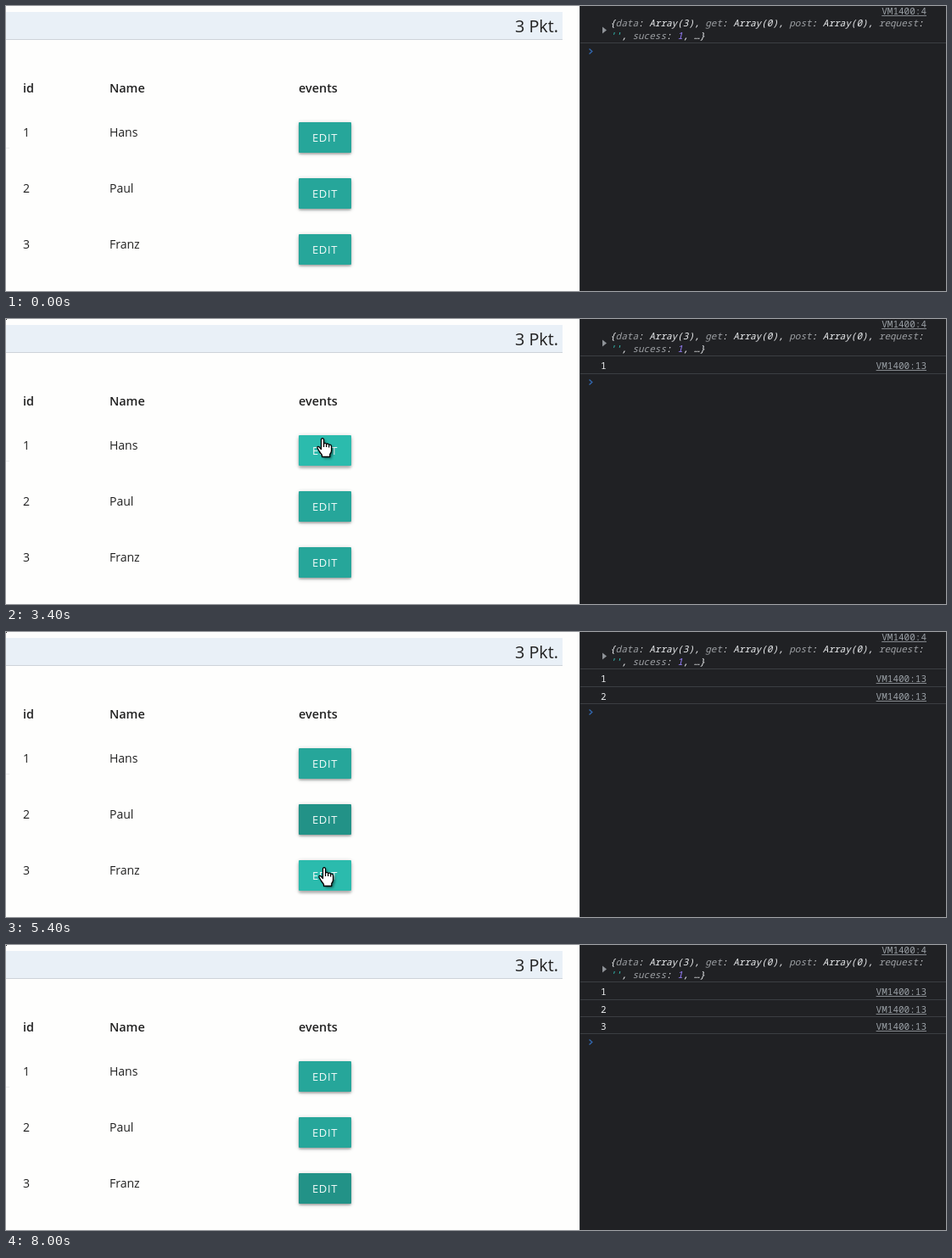
These frames come from a looping animation (1108x336 px, 8200 ms). An HTML page with a canvas:

```html
<!DOCTYPE html>
<html lang="de">
<head>
<meta charset="utf-8">
<title>Edit buttons and console</title>
<style>
html, body { margin: 0; width: 100%; height: 100%; overflow: hidden; background: #fefefd; }
canvas { display: block; }
</style>
</head>
<body>
<canvas id="stage" width="1108" height="336"></canvas>
<script>
const ctx = document.getElementById('stage').getContext('2d');
const LOOP = 8200, STEP = 200;
const SANS = '"Open Sans", "Noto Sans", sans-serif';
const MONO = '"Noto Sans Mono", "DejaVu Sans Mono", monospace';
const CHAR = 6.6;

const NAMES = ['Hans', 'Paul', 'Franz'];
const CLICKS = [3400, 4600, 6200];
const BTN = { x: 345, w: 62, h: 36 };
const btnY = i => 137 + 66 * i;

// [time, x, y] of the pointer tip
const POINTER = [
  [200, 986, 252], [400, 968, 270], [1399, 968, 270], [1400, 410, 246],
  [2200, 373, 141], [2400, 373, 140], [3600, 373, 140],
  [4200, 374, 217], [4400, 374, 218], [4800, 374, 218],
  [5400, 375, 277], [5600, 374, 280], [7200, 374, 280]
];

// [time, tone]: -1 focused, 0 idle, 1 hovered
const TONES = [
  [[1800, 0], [2200, 1], [3600, 1], [4200, -.9], [4400, -1], [4600, -1], [5000, 0]],
  [[1400, 0], [1600, .7], [2000, 0], [3800, 0], [4200, 1], [4800, 1], [5400, -.5], [5600, -1], [6200, -1], [6600, 0]],
  [[1399, 0], [1400, .5], [1800, 0], [4800, 0], [5200, 1], [7000, 1], [7200, -.6], [7400, -1], [7800, -1], [8000, -.5], [8200, 0]]
];
const FOCUS = [29, 125, 116], IDLE = [38, 166, 154], HOVER = [43, 187, 173];

const mix = (a, b, k) => a.map((v, i) => v + (b[i] - v) * k);

function sample(keys, t) {
  if (t <= keys[0][0]) return keys[0].slice(1);
  for (let i = 1; i < keys.length; i++) {
    const a = keys[i - 1], b = keys[i];
    if (t <= b[0]) {
      const k = (t - a[0]) / (b[0] - a[0]);
      return mix(a, b, k).slice(1);
    }
  }
  return keys[keys.length - 1].slice(1);
}

function rect(x, y, w, h, color) {
  ctx.fillStyle = color;
  ctx.fillRect(x, y, w, h);
}

function text(str, x, y, font, color, align = 'left') {
  ctx.font = font;
  ctx.fillStyle = color;
  ctx.textAlign = align;
  ctx.fillText(str, x, y);
}

function drawPage() {
  rect(0, 0, 677, 336, '#fefefd');
  rect(0, 7, 656, 32, '#e9f0f7');
  rect(0, 39, 656, 1, '#cdd3d9');
  rect(0, 167, 4, 1, '#eeeeee');
  text('3 Pkt.', 651, 31, '19.8px ' + SANS, '#212121', 'right');

  const bold = '600 14.4px ' + SANS;
  text('id', 20, 102, bold, '#212121');
  text('Name', 122, 102, bold, '#212121');
  text('events', 345, 102, bold, '#212121');
  NAMES.forEach((name, i) => {
    const y = 154 + 66 * i;
    text(String(i + 1), 20, y, '14px ' + SANS, '#212121');
    text(name, 122, y, '14px ' + SANS, '#212121');
  });
}

function drawButton(i, t) {
  const y = btnY(i), tone = sample(TONES[i], t)[0];
  const rgb = mix(IDLE, tone < 0 ? FOCUS : HOVER, Math.abs(tone));
  const lift = Math.max(0, tone);
  ctx.save();
  ctx.beginPath();
  ctx.roundRect(BTN.x, y, BTN.w, BTN.h, 2);
  ctx.fillStyle = `rgb(${rgb.map(Math.round)})`;
  for (const [dy, blur, alpha] of [[2 + lift, 2 + lift, .2], [1, 5, .24]]) {
    ctx.shadowColor = `rgba(0,0,0,${alpha})`;
    ctx.shadowOffsetY = dy;
    ctx.shadowBlur = blur;
    ctx.fill();
  }
  ctx.shadowColor = 'transparent';
  ctx.fill();

  const age = (t - CLICKS[i]) / 600;
  if (age > 0 && age < 1) {
    const [px, py] = sample(POINTER, CLICKS[i]);
    ctx.clip();
    ctx.beginPath();
    ctx.arc(px, py, 60 * age, 0, Math.PI * 2);
    ctx.fillStyle = `rgba(255,255,255,${.3 * (1 - age)})`;
    ctx.fill();
  }
  ctx.letterSpacing = '0.6px';
  text('EDIT', 361, y + 23, '13px ' + SANS, '#f4fbfa');
  ctx.restore();
}

function drawLink(label, y) {
  const w = label.length * CHAR;
  text(label, 1085, y, '11px ' + MONO, '#9aa0a6', 'right');
  rect(1085 - w, y + 1, w, 1, '#85898e');
}

// Parts: k = key, s = string, n = number, p = plain
function drawParts(parts, x, y) {
  const colors = { k: '#9da0a4', s: '#35d4c7', n: '#9980ff', p: '#eceef0' };
  for (const [kind, str] of parts) {
    text(str, x, y, 'italic 11px ' + MONO, colors[kind]);
    x += str.length * CHAR;
  }
}

function drawConsole(t) {
  rect(676, 0, 432, 336, '#202124');
  rect(676, 0, 1, 336, '#35373a');
  drawLink('VM1400:4', 10);
  drawParts([
    ['p', '{'], ['k', 'data'], ['p', ': Array(3), '], ['k', 'get'], ['p', ': Array(0), '],
    ['k', 'post'], ['p', ': Array(0), '], ['k', 'request'], ['p', ':']
  ], 712, 24);
  drawParts([['s', "''"], ['p', ', '], ['k', 'sucess'], ['p', ': '], ['n', '1'], ['p', ', …}']], 712, 39);

  ctx.fillStyle = '#8f9398';
  ctx.beginPath();
  ctx.moveTo(703, 24.5);
  ctx.lineTo(708, 28.5);
  ctx.lineTo(703, 32.5);
  ctx.fill();

  const lines = [43, 64, 84, 104], bases = [59, 80, 100];
  const count = CLICKS.filter(c => t >= c).length;
  for (let i = 0; i <= count; i++) rect(677, lines[i], 431, 1, '#3b3e42');
  for (let i = 0; i < count; i++) {
    text(String(i + 1), 701, bases[i], '11px ' + MONO, '#eceef0');
    drawLink('VM1400:13', bases[i]);
  }

  const y = lines[count] + 10.5;
  ctx.strokeStyle = '#3267ad';
  ctx.lineWidth = 1.4;
  ctx.beginPath();
  ctx.moveTo(687.5, y - 3);
  ctx.lineTo(690.8, y);
  ctx.lineTo(687.5, y + 3);
  ctx.stroke();
}

const ARROW = new Path2D('M.5 .5V16.3L4.1 12.9L6.6 18.5L9.2 17.4L6.8 11.9H11.6Z');
const HAND = new Path2D('M-1.5 1.8Q0 -.4 1.6 1.8V7Q3.4 5.6 4.7 7.5Q6.5 6.2 7.7 8.3Q10.6 7.5 10.6 11V15Q10.6 17.5 8.8 19.5V22.5H-.5V20.5L-3.4 16.5L-6 12.2Q-6.3 9.7 -4 10.7L-1.5 13.5Z');
const FINGERS = new Path2D('M1.6 7V11M4.7 7.5V11M7.7 8.3V11.5');

function drawPointer(t) {
  if (t < 200 || t >= 7200) return;
  const [x, y] = sample(POINTER, t);
  const over = NAMES.some((_, i) =>
    x >= BTN.x && x < BTN.x + BTN.w && y >= btnY(i) && y < btnY(i) + BTN.h);
  const shape = over ? HAND : ARROW;
  ctx.save();
  ctx.translate(Math.round(x), Math.round(y));
  ctx.lineJoin = 'round';
  ctx.lineWidth = over ? 1.3 : 1;
  ctx.strokeStyle = '#000';
  ctx.fillStyle = '#fff';
  ctx.shadowColor = 'rgba(0,0,0,.45)';
  ctx.shadowOffsetX = ctx.shadowOffsetY = 2;
  ctx.shadowBlur = 3;
  ctx.fill(shape);
  ctx.shadowColor = 'transparent';
  ctx.stroke(shape);
  if (over) ctx.stroke(FINGERS);
  ctx.restore();
}

function draw(t) {
  drawPage();
  NAMES.forEach((_, i) => drawButton(i, t));
  drawConsole(t);
  drawPointer(t);
  if (t >= 200) rect(0, 0, 1, 1, '#202020');
}

const start = performance.now();
function loop() {
  const t = (performance.now() - start) % LOOP;
  draw(Math.floor(t / STEP) * STEP);
  requestAnimationFrame(loop);
}
loop();
</script>
</body>
</html>
```
